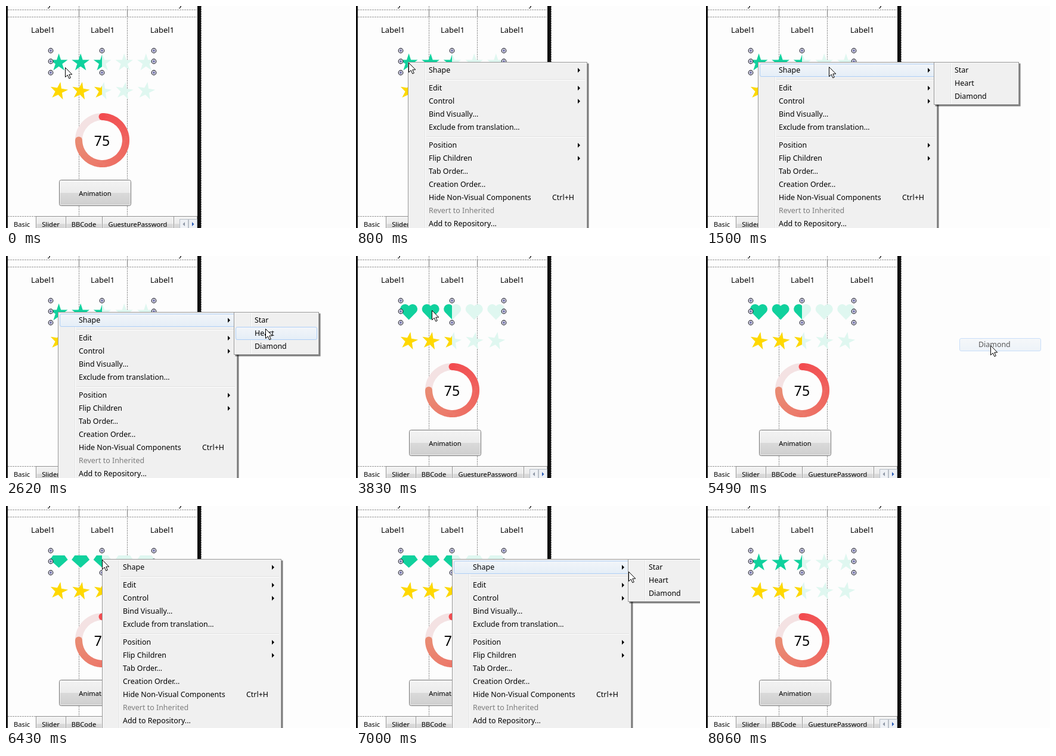
Write an HTML page that moves like this. It is 577x373 px and loops after 8370 ms.

```html
<!DOCTYPE html>
<html lang="en">
<head>
<meta charset="utf-8">
<title>Rating shape menu</title>
<style>
html, body { margin: 0; width: 100%; height: 100%; overflow: hidden; background: #fdfdfd; }
svg { display: block; width: 577px; height: 373px; }
text { font: 12.45px "Noto Sans", "Open Sans", sans-serif; fill: #000; white-space: pre; }
.label { font-size: 13px; text-anchor: middle; }
.small { font-size: 11.2px; }
.mid { text-anchor: middle; }
.value { font-size: 23px; text-anchor: middle; }
.dash { fill: none; stroke: #9a9a9a; stroke-dasharray: 3 1; }
.box { fill: #f0f0f0; stroke: #979797; }
.off { fill: #7c7c7c; }
.hot { fill: url(#hot); stroke: #aecff7; }
</style>
</head>
<body>
<svg id="stage" viewBox="0 0 577 373">
  <defs>
    <linearGradient id="btn" x2="0" y2="1">
      <stop offset="0" stop-color="#f3f3f3"/><stop offset=".5" stop-color="#ebebeb"/>
      <stop offset=".5" stop-color="#dadada"/><stop offset="1" stop-color="#cfcfcf"/>
    </linearGradient>
    <linearGradient id="hot" x2="0" y2="1">
      <stop offset="0" stop-color="#f2f5f9"/><stop offset="1" stop-color="#e5eef7"/>
    </linearGradient>
    <filter id="shadow" x="-5%" y="-5%" width="115%" height="115%">
      <feDropShadow dx="2.5" dy="2.5" stdDeviation=".7" flood-opacity=".5"/>
    </filter>
    <clipPath id="filled"><rect width="161" height="373"/></clipPath>
  </defs>

  <rect width="577" height="373" fill="#fdfdfd"/>
  <path class="dash" d="M3 6.5H320M3 18.5H320M122.5 0V353M203.5 0V353M3 353.5H320"/>
  <path class="dash" d="M327.5 0V373" style="stroke: #777"/>
  <path d="M122.5 7V18M203.5 7V18" stroke="#777"/>
  <path d="M0 0H3V373H0ZM321 0H327V373H321Z" fill="#111"/>
  <text class="label" x="73" y="1">y</text>
  <text class="label" x="293" y="1">y</text>
  <text class="label" x="62" y="45">Label1</text>
  <text class="label" x="162" y="45">Label1</text>
  <text class="label" x="262" y="45">Label1</text>

  <g id="top"></g>
  <g id="low"></g>
  <g id="handles"></g>
  <g id="ring" fill="none" stroke-width="12" transform="translate(161.5 225.5)"></g>
  <text class="value" x="161" y="235">75</text>

  <rect x="89.5" y="292.5" width="120" height="43" rx="3" fill="url(#btn)" stroke="#707070"/>
  <rect x="90.5" y="293.5" width="118" height="41" rx="2" fill="none" stroke="#fff" stroke-opacity=".7"/>
  <text class="small mid" x="149.5" y="319">Animation</text>

  <g id="tabs"></g>
  <g stroke="#b9c0c8" fill="#eef1f5">
    <rect x="291.5" y="358.5" width="14" height="16"/>
    <rect x="306.5" y="358.5" width="14" height="16"/>
  </g>
  <path d="M300 363V370L296.500 366.500Z" fill="#8d96a5"/>
  <path d="M312 363V370L315.500 366.500Z" fill="#2f5fb8"/>

  <g id="popup">
    <g id="menu"></g>
    <g id="sub"></g>
  </g>
  <path id="cursor" d="M.5 .5V16.500L4.200 13L6.800 18.800L9.300 17.700L6.800 12H11.800Z" fill="#fff" stroke="#000"/>
</svg>
<script>
const LOOP = 8370;
const $ = id => document.getElementById(id);

function add(parent, tag, attrs, text) {
  const el = document.createElementNS('http://www.w3.org/2000/svg', tag);
  for (const k in attrs) el.setAttribute(k, attrs[k]);
  if (text) el.textContent = text;
  return parent.appendChild(el);
}

const polar = (r, deg) => {
  const a = (deg - 90) * Math.PI / 180;
  return [r * Math.cos(a), r * Math.sin(a)].map(v => v.toFixed(2)).join(' ');
};

function star(turn) {
  const pts = [];
  for (let i = 0; i < 10; i++) pts.push(polar(i % 2 ? 6 : 15.6, i * 36 + turn));
  return 'M' + pts.join('L') + 'Z';
}

const shapes = {
  Star: star(0),
  Heart: 'M0 11.800L-12.600 -1.100A7.900 7.900 0 0 1 0 -11.400A7.900 7.900 0 0 1 12.600 -1.100Z',
  Diamond: 'M-9.800 -12.300H9.800L15 -5.200L0 8.400L-15 -5.200Z'
};

function rating(g, y, color, d) {
  const paths = [];
  for (const [fill, clip] of [['#dff7f0', 'none'], [color, 'url(#filled)']]) {
    const row = add(g, 'g', { fill, 'clip-path': clip });
    for (let i = 0; i < 5; i++)
      paths.push(add(row, 'path', { d, transform: `translate(${88.6 + i * 36.55} ${y})` }));
  }
  return paths;
}
const topPaths = rating($('top'), 95.4, '#10d19d', shapes.Star);
rating($('low'), 143, '#ffd800', star(10));

for (const y of [75, 93, 112])
  for (const x of [75, 161, 248]) {
    if (x === 161 && y === 93) continue;
    add($('handles'), 'circle', { cx: x, cy: y, r: 3.8, fill: '#fff', stroke: '#262638', 'stroke-width': 1.2 });
    add($('handles'), 'circle', { cx: x, cy: y, r: 2.2, fill: '#7d7db0' });
  }

// Progress ring: 75 % with a colour sweep.
function drawRing(g, r, sweep, n) {
  const from = [242, 76, 80], to = [233, 139, 115];
  const mix = k => `rgb(${from.map((a, i) => Math.round(a + (to[i] - a) * k))})`;
  const cap = (deg, k) => {
    const [cx, cy] = polar(r, deg).split(' ');
    add(g, 'circle', { cx, cy, r: 6, fill: mix(k), stroke: 'none' });
  };
  add(g, 'circle', { r, stroke: '#f4e2e3' });
  cap(0, 0);
  for (let i = 0; i < n; i++) {
    const a = i * sweep / n, b = Math.min(sweep, a + 3.6);
    add(g, 'path', { d: `M${polar(r, a)}A${r} ${r} 0 0 1 ${polar(r, b)}`, stroke: mix(i / n) });
  }
  cap(sweep, 1);
}
drawRing($('ring'), 39.5, 270, 90);

for (const [x, w, name] of [[50, 50, 'Slider'], [100, 61, 'BBCode'], [161, 120, 'GuesturePassword'], [281, 39, '']]) {
  add($('tabs'), 'rect', { x: x + .5, y: 353.5, width: w, height: 26, fill: 'url(#btn)', stroke: '#8e8e8e' });
  add($('tabs'), 'path', { d: `M${x + 1.5} 373V354.500H${x + w - .5}V373`, fill: 'none', stroke: '#fff', 'stroke-opacity': .6 });
  add($('tabs'), 'text', { class: 'small mid', x: x + w / 2, y: 371 }, name);
}
add($('tabs'), 'text', { class: 'small', x: 13, y: 371 }, 'Basic');

// Context menu, in coordinates local to its corner.
function panel(g, x, w, h) {
  add(g, 'rect', { class: 'box', x: x + .5, y: .5, width: w, height: h, filter: 'url(#shadow)' });
  add(g, 'rect', { x: x + 1.5, y: 1.5, width: w - 2, height: h - 2, fill: 'none', stroke: '#f5f5f5' });
  add(g, 'path', { d: `M${x + 28.5} 2V${h - 1}`, stroke: '#e2e3e3' });
  add(g, 'path', { d: `M${x + 29.5} 2V${h - 1}`, stroke: '#fff' });
}
const hot = (g, x, y, width) => add(g, 'rect', { class: 'hot', x: x + .5, y: y + .5, width, height: 21, rx: 2.5 });

const menu = $('menu'), sub = $('sub');
panel(menu, 0, 300, 330);
const shapeHot = hot(menu, 3, 3, 294);
const groups = [
  ['Shape>'],
  ['Edit>', 'Control>', 'Bind Visually...', 'Exclude from translation...'],
  ['Position>', 'Flip Children>', 'Tab Order...', 'Creation Order...',
    'Hide Non-Visual Components', 'Revert to Inherited', 'Add to Repository...']
];
let y = 14;
groups.forEach((items, i) => {
  if (i) {
    add(menu, 'path', { d: `M31 ${y - 14.5}H297`, stroke: '#e0e0e0' });
    add(menu, 'path', { d: `M31 ${y - 13.5}H297`, stroke: '#fff' });
  }
  for (const item of items) {
    const name = item.replace('>', '');
    add(menu, 'text', { x: 35, y: y + 4, class: /^Revert/.test(name) ? 'off' : '' }, name);
    if (item !== name) add(menu, 'path', { d: `M285 ${y - 4}V${y + 4}L289 ${y}Z` });
    if (/^Hide/.test(name)) add(menu, 'text', { x: 242, y: y + 4 }, 'Ctrl+H');
    y += 22;
  }
  y += 8;
});

const subBox = add(sub, 'g', {});
panel(subBox, 295, 142, 71);
const rows = Object.keys(shapes).map((name, i) => {
  const bar = hot(sub, 298, 3 + 22 * i, 136);
  const text = add(sub, 'text', { x: 330, y: 18 + 22 * i }, name);
  return { name, bar, text };
});

const menus = [
  { x: 87, y: 94, open: 800, sub: 1500, close: 3080, pick: 'Heart' },
  { x: 127, y: 91, open: 4140, sub: 4600, close: 5490, pick: 'Diamond' },
  { x: 161, y: 89, open: 6430, sub: 6840, close: 7520, pick: 'Star' }
];
const FADE = 150;

// Pointer moves: start, end, number of jumps, destination.
const moves = [
  [150, 270, 2, 88, 95],
  [1110, 1500, 4, 206, 102],
  [1620, 2020, 3, 390, 105],
  [2170, 2620, 4, 435, 122],
  [3230, 3830, 5, 127, 91],
  [4270, 4670, 4, 440, 103],
  [4800, 5070, 3, 472, 145],
  [5220, 5220, 1, 477, 150],
  [5640, 6060, 4, 161, 90],
  [6570, 7000, 4, 457, 110],
  [7150, 7270, 2, 497, 104],
  [7670, 8060, 4, 590, 150]
];

function pointer(t) {
  let x = 99, y = 103;
  for (const [a, b, n, tx, ty] of moves) {
    if (t < a) break;
    const k = n > 1 ? Math.min(n, 1 + Math.floor((t - a) / (b - a) * (n - 1) + 1e-6)) / n : 1;
    x += (tx - x) * k;
    y += (ty - y) * k;
  }
  return [Math.round(x), Math.round(y)];
}

const show = (el, on) => el.setAttribute('visibility', on ? 'visible' : 'hidden');

function draw(t) {
  const [cx, cy] = pointer(t);
  $('cursor').setAttribute('transform', `translate(${cx} ${cy})`);

  let shape = 'Star';
  for (const m of menus) if (t >= m.close + FADE) shape = m.pick;
  for (const p of topPaths) p.setAttribute('d', shapes[shape]);

  const m = menus.find(m => t >= m.open && t < m.close + FADE);
  $('popup').setAttribute('display', m ? 'inline' : 'none');
  if (!m) return;

  const lx = cx - m.x, ly = cy - m.y;
  const fading = t >= m.close, subOpen = t >= m.sub && !fading;
  $('popup').setAttribute('transform', `translate(${m.x} ${m.y})`);
  show(menu, !fading);
  show(shapeHot, !fading && (subOpen || (lx >= 3 && lx < 298 && ly >= 3 && ly < 25)));
  show(subBox, subOpen);
  sub.setAttribute('opacity', fading ? .65 : 1);
  rows.forEach(({ name, bar, text }, i) => {
    const over = lx >= 298 && lx < 435 && Math.floor((ly - 3) / 22) === i;
    show(bar, fading ? name === m.pick : subOpen && over);
    show(text, fading ? name === m.pick : subOpen);
  });
}

function tick() {
  draw(performance.now() % LOOP);
  requestAnimationFrame(tick);
}
tick();
</script>
</body>
</html>
```
